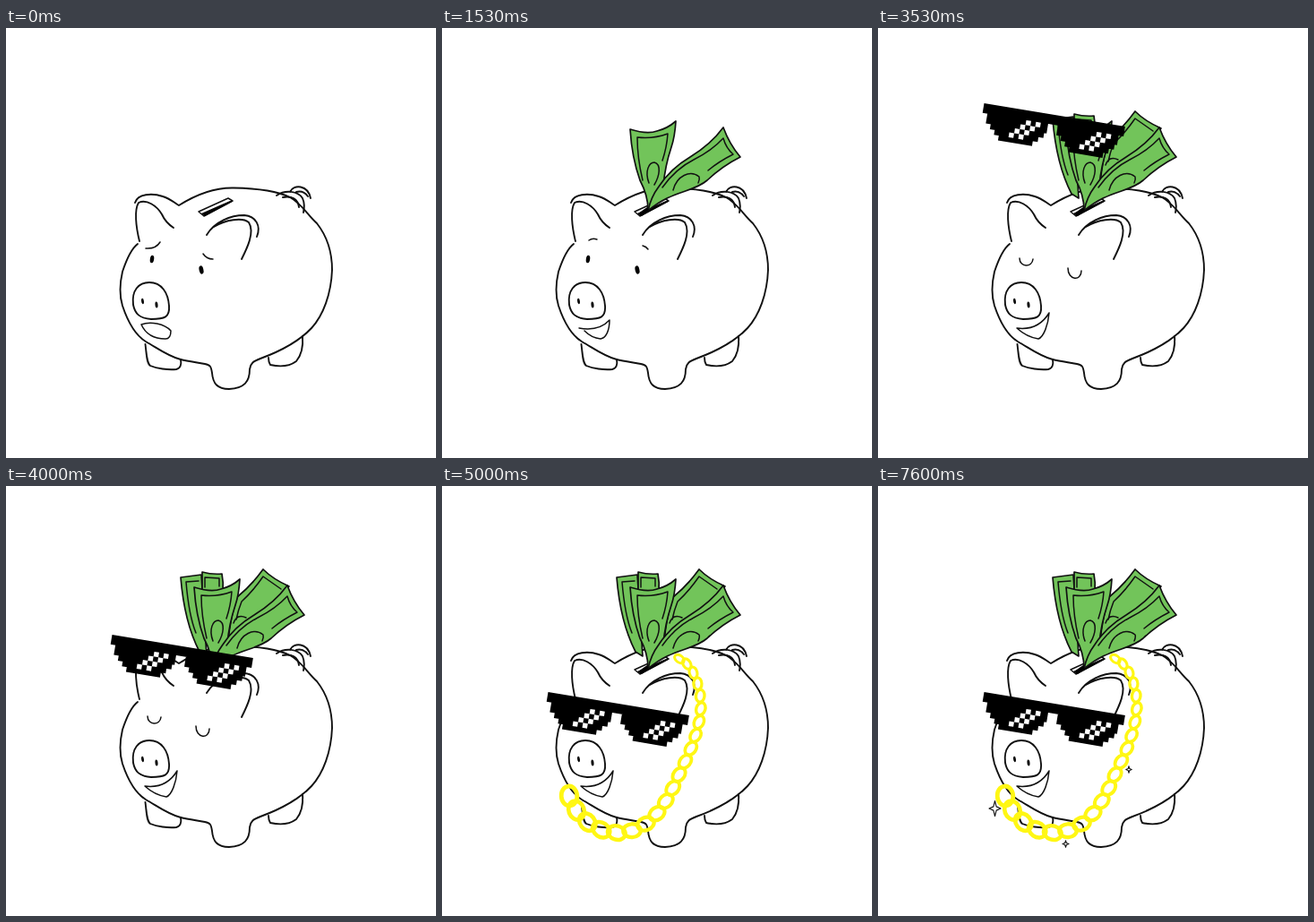
Write an HTML page that moves like this. It is 480 px wide and 480 px high and loops after 8000 ms.

```html
<!DOCTYPE html>
<html lang="en">
<head>
<meta charset="utf-8">
<title>Piggy bank</title>
<style>
  html, body { margin: 0; width: 100%; height: 100%; overflow: hidden; background: #fff; }
  svg { display: block; width: 100%; height: 100%; }
  .ink { fill: none; stroke: #111; stroke-width: 1.9; stroke-linecap: round; stroke-linejoin: round; }
  .thin { stroke-width: 1.5; }
  .solid { fill: #000; stroke: none; }
  .bill { fill: #72c45a; stroke-width: 1.7; }
  #chain { fill: none; stroke: #fff714; }
  #stars { fill: #fff; stroke: #111; stroke-width: 1.1; stroke-linejoin: round; }
</style>
</head>
<body>
<svg viewBox="0 0 480 480">
  <g class="ink">
    <!-- body and front leg -->
    <path d="M144 195C147 185 163 184 175 188C182 190 188 195 193 198C212 186 231 178 254 178.500C280 179 303 182 317 189C330 196 336 208 347 218C358 232 364 250 364 270C363 297 354 321 341 335C326 351 303 362 284 369C276 372 273 374 272 381C272 395 266 402 249 403C236 403 231 397 230 385C229 378 228 376 222 375C211 373 203 372 195 370C182 367 170 358 156 350C143 342 135 325 130 310C126 297 127 285 130 272C134 260 139 247 147 241"/>
    <!-- back legs -->
    <path d="M155.500 353C157 365 157 374 161 377C168 380 181 382 190 381C195 380 196 375 195 370M331 344C332 356 329 366 324 372C316 378 304 378 295 376Q293 373 293 368"/>
    <!-- ears -->
    <path d="M149 238C145 222 143 203 148 195C157 191 168 198 174 208Q178 217 187 223M224 231C233 216 251 209 266 209C279 210 285 221 280 233M232 222C245 214 264 211 271 217C278 228 269 246 263 258"/>
    <!-- tail -->
    <path d="M302 187C312 180 326 182 331 190Q334 197 332 206M309 189C319 187 326 191 327 200M317 183C321 174 337 175 340 190M324 183Q332 181 337 188"/>
    <!-- snout -->
    <path d="M142 309C140 293 148 284 160 284C174 284 181 296 182 310C183 323 177 325 162 325C149 324 144 319 142 309Z"/>
    <ellipse class="solid" cx="152.500" cy="305" rx="1.400" ry="3.300" transform="rotate(-6 152 305)"/>
    <ellipse class="solid" cx="168" cy="309" rx="1.500" ry="3.500" transform="rotate(-6 168 309)"/>
    <!-- coin slot -->
    <path class="thin" d="M215 205L248 190L253 193L221 210Z"/>
    <path class="solid" d="M218 207L250 193L252 194L222 210Z"/>
  </g>

  <!-- face: data-t holds the visible span in ms -->
  <g class="ink thin">
    <path data-t="0 1000" d="M156 246Q167 247 172 239M220 252Q224 258 231 258"/>
    <path data-t="1000 2270" d="M164 237Q168 234 173 236M224 243Q228 244 230 247"/>
    <g class="solid" data-t="0 2270">
      <ellipse cx="163" cy="258" rx="2.200" ry="4.300" transform="rotate(8 163 258)"/>
      <ellipse cx="218" cy="270" rx="2.400" ry="4.700" transform="rotate(-12 218 270)"/>
    </g>
    <path data-t="2270 8000" d="M158 257C158 267 172 268 173 258M212 268C212 282 227 283 227 271"/>
    <path data-t="0 1000" d="M151 331C161 327 177 330 184 338Q184 347 178 347C166 347 156 342 151 331Z"/>
    <path data-t="1000 1530" d="M151 332Q166 337 184 337Q184 347 178 347C166 347 156 342 151 332Z"/>
    <path data-t="1530 2000" d="M153 335Q175 339 187 326C187 338 183 346 177 347Q167 346 159 338"/>
    <path data-t="2000 8000" d="M155 335Q179 338 191 318C190 331 185 345 179 347Q166 345 155 335Z"/>
  </g>

  <g class="ink thin">
    <g data-t="2530 8000">
      <path class="bill" d="M195 102L218 99L224 190L216 185Q199 152 195 102Z"/>
      <path d="M215 106L201 107Q204 144 212 164"/>
      <path class="bill" d="M219 96Q230 99 241 98Q243 108 242 118L219 120Z"/>
      <path d="M222 113V102L238 103V112"/>
    </g>
    <g data-t="2000 8000">
      <path class="bill" d="M287 93Q298 104 316 112L284 154L248 174Q250 148 258 124Q274 111 287 93Z"/>
      <path d="M307 115L287 101Q276 117 263 129Q259 139 257 149M254 153Q258 142 268 147"/>
    </g>
    <g data-t="1530 8000">
      <path class="bill" d="M210 113Q229 119 240 115Q252 112 261 104Q260 121 256 133Q249 154 247 176L230 203Q230 187 221 170Q212 145 210 113Z"/>
      <path d="M224 170Q218 145 218 122Q236 124 252 118Q251 133 246 148M231 173C226 160 231 150 237 150C245 152 243 165 237 175"/>
    </g>
    <g data-t="1000 8000">
      <path class="bill" d="M314 111Q321 130 333 144Q313 154 296 170C280 184 257 181 230 204Q233 189 242 177Q255 157 277 144Q300 130 314 111Z"/>
      <path d="M246 178Q261 157 281 147Q301 137 314 123Q317 134 325 141Q309 149 297 159M258 181C262 165 277 158 287 166Q288 169 286 173"/>
      <path class="solid" d="M219 207L229 200L231 204L223 210Z"/>
    </g>
  </g>

  <g id="chain" data-t="5000 8000"></g>
  <g id="shades" data-t="3000 8000"></g>
  <path id="stars" data-t="5530 8000"/>
</svg>

<script>
const $ = id => document.getElementById(id);
const timed = [...document.querySelectorAll('[data-t]')].map(el => [el, ...el.dataset.t.split(' ').map(Number)]);

// Chain links follow a smooth loop, small and close at the top, large at the bottom.
const track = document.createElementNS('http://www.w3.org/2000/svg', 'path');
track.setAttribute('d', 'M265 193C280 199 288 221 289 243C289 270 277 297 266 319C253 349 238 382 202 387C172 389 150 370 142 346');
const len = track.getTotalLength(), links = 21;
let chain = '';
for (let i = 0; i < links; i++) {
  const k = i / (links - 1), s = k ** 1.15 * len;
  const p = track.getPointAtLength(s);
  const q = track.getPointAtLength(Math.min(s + 1, len)), r = track.getPointAtLength(Math.max(s - 1, 0));
  const turn = Math.atan2(q.y - r.y, q.x - r.x) * 180 / Math.PI;
  const size = 6 + 5 * k;
  chain += `<ellipse rx="${size}" ry="${size * (0.65 + 0.15 * k)}" stroke-width="${3 + 1.8 * k}"
    transform="translate(${p.x} ${p.y}) rotate(${turn + 14})"/>`;
}
$('chain').innerHTML = chain;

// Pixel sunglasses on a tilted grid: [column, row, width, height].
const cell = 5.5, lensGap = 14.5;
const box = ([x, y, w, h]) => `M${x * cell} ${y * cell}h${w * cell}v${h * cell}h${-w * cell}z`;
const lens = [[1, 1, 12.5, 3], [2, 1, 11, 4], [3, 1, 9, 5], [4, 1, 7, 6]];
const glints = [];
for (let row = 0; row < 4; row++)
  for (const dx of [0, 2]) glints.push([9 - row + dx, 2 + row, 1, 1]);
const pair = cells => [...cells, ...cells.map(([x, ...rest]) => [x + lensGap, ...rest])].map(box).join('');
$('shades').innerHTML = `<path d="${box([0, 0, 29, 2])}${pair(lens)}"/><path fill="#fff" d="${pair(glints)}"/>`;

const star = (x, y, w, h) => {
  const a = w * 0.25, b = h * 0.25;
  return `M${x} ${y - h}L${x + a} ${y - b}L${x + w} ${y}L${x + a} ${y + b}L${x} ${y + h}` +
    `L${x - a} ${y + b}L${x - w} ${y}L${x - a} ${y - b}Z`;
};

function draw(now) {
  const t = now % 8000;
  for (const [el, from, to] of timed) el.style.display = t >= from && t < to ? '' : 'none';

  const top = t < 3530 ? 4 : t < 4000 ? 84 : t < 4530 ? 166 : 230;
  $('shades').setAttribute('transform', `translate(118.500 ${top}) rotate(9.400)`);

  const big = (t >= 6000 && t < 6530) || (t >= 7000 && t < 7530);
  $('stars').setAttribute('d', big
    ? star(130, 360, 14, 17) + star(280, 317, 8, 9) + star(210, 399, 8, 9)
    : star(130.5, 360, 6.5, 8.5) + star(280, 316.5, 3.2, 3.8) + star(209.5, 399.5, 3.5, 3.8));
}
(function loop() {
  draw(performance.now());
  requestAnimationFrame(loop);
})();
</script>
</body>
</html>
```
